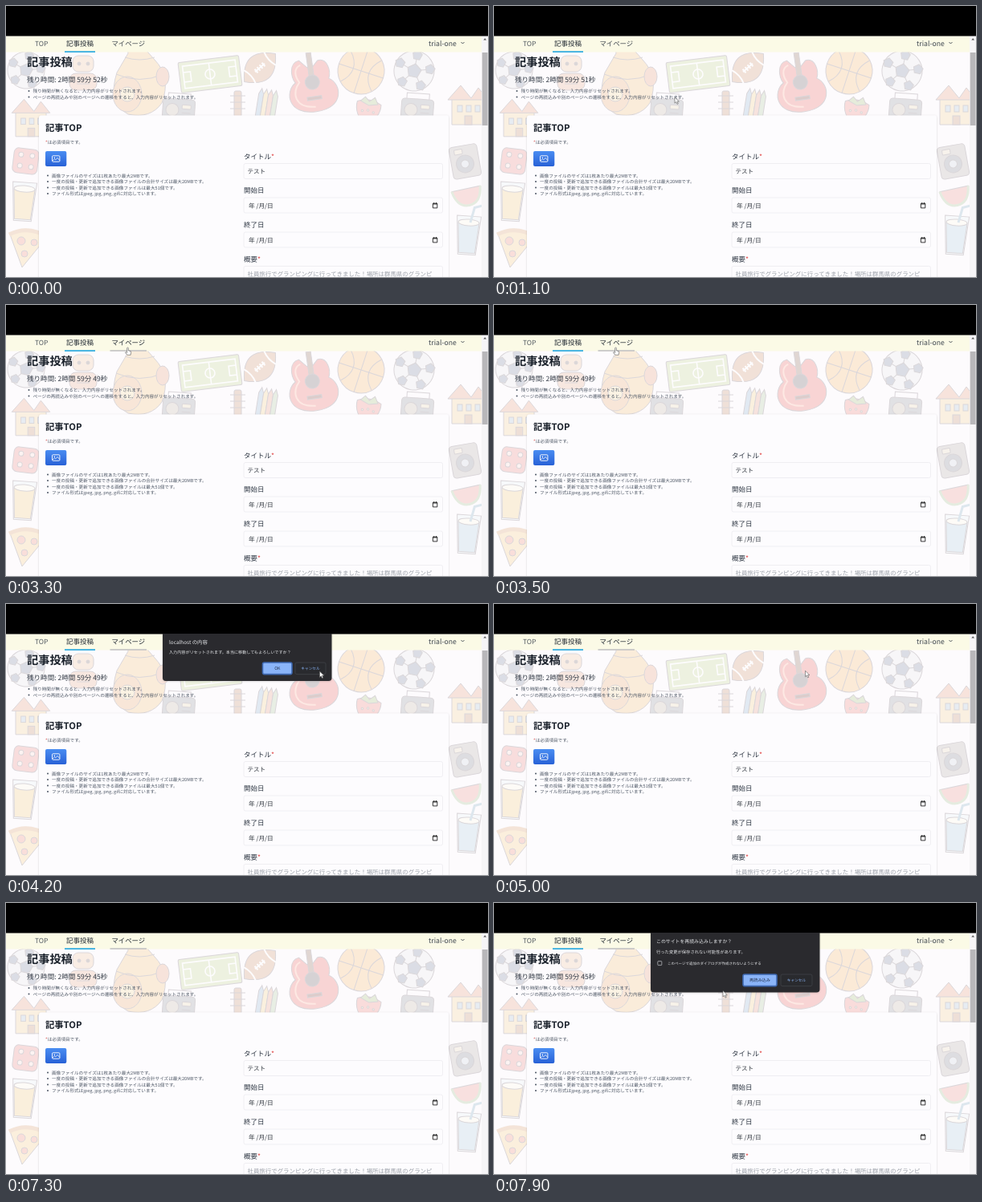
An HTML page for the animation above (8 s loop, 600 px wide and 338 px high).

```html
<!DOCTYPE html>
<html lang="ja">
<head>
<meta charset="utf-8">
<style>
html, body { margin: 0; width: 100%; height: 100%; overflow: hidden; background: #000; }
svg { display: block; width: 100vw; height: 100vh; }
text { font-family: "Noto Sans CJK JP", "Noto Sans", sans-serif; white-space: pre; text-rendering: geometricPrecision; }
</style>
</head>
<body>
<svg id="stage" viewBox="0 0 600 338" xmlns="http://www.w3.org/2000/svg"></svg>
<script>
const LOOP = 8000;
const stage = document.getElementById('stage');

const text = (x, y, size, str, fill = '#333a44', weight = 400, extra = '') =>
  `<text x="${x}" y="${y}" font-size="${size}" fill="${fill}" font-weight="${weight}" ${extra}>${str}</text>`;
const rect = (x, y, w, h, fill, r = 0, extra = '') =>
  `<rect x="${x}" y="${y}" width="${w}" height="${h}" rx="${r}" fill="${fill}" ${extra}/>`;
const circle = (x, y, r, fill, extra = '') => `<circle cx="${x}" cy="${y}" r="${r}" fill="${fill}" ${extra}/>`;
const ellipse = (x, y, rx, ry, fill) => `<ellipse cx="${x}" cy="${y}" rx="${rx}" ry="${ry}" fill="${fill}"/>`;
const path = (d, fill = 'none', extra = '') => `<path d="${d}" fill="${fill}" ${extra}/>`;
const at = (x, y, angle, body) => `<g transform="translate(${x} ${y}) rotate(${angle})">${body}</g>`;
const range = n => [...Array(n).keys()];

// Faded toy and leisure wallpaper
function soccerBall(x, y, r) {
  const patch = (cx, cy, s) => path('M' + range(5).map(i => {
    const a = (i * 72 - 90) * Math.PI / 180;
    return `${(cx + s * Math.cos(a)).toFixed(1)} ${(cy + s * Math.sin(a)).toFixed(1)}`;
  }).join('L') + 'Z', '#77839c');
  const outer = range(5).map(i => {
    const a = (i * 72 - 90) * Math.PI / 180;
    const c = Math.cos(a) * r, s = Math.sin(a) * r;
    return path(`M${c * .35} ${s * .35}L${c * .7} ${s * .7}`) + patch(c * .8, s * .8, r * .25);
  }).join('');
  return at(x, y, 12, circle(0, 0, r, '#e4e6ea') + patch(0, 0, r * .36) + outer);
}

function basketball(x, y, r) {
  return at(x, y, 18, circle(0, 0, r, '#f5b465') +
    path(`M0 ${-r}V${r}M${-r} 0H${r}M${-r * .7} ${-r * .7}Q0 0 ${-r * .7} ${r * .7}M${r * .7} ${-r * .7}Q0 0 ${r * .7} ${r * .7}`));
}

function football(x, y) {
  return at(x, y, -42, path('M-26 0Q-13 -17 0 -17Q13 -17 26 0Q13 17 0 17Q-13 17 -26 0Z', '#cf9069') +
    path('M-17 -11Q-13 0 -17 11M17 -11Q13 0 17 11M-8 0H8M-6 -3V3M-2 -3V3M2 -3V3M6 -3V3', 'none', 'stroke="#fff" stroke-width="2"'));
}

function guitar(x, y) {
  return at(x, y, -8,
    path('M-13 -34C-27 -32 -25 -14 -21 -7C-36 2 -36 32 0 32C36 32 36 2 21 -7C25 -15 23 -33 10 -31L3 -24H-4Z', '#ea5f58') +
    path('M-12 -28C-22 -25 -20 -14 -16 -7C-27 4 -27 24 0 26', 'none', 'stroke="#ffae95" stroke-width="2"') +
    rect(-3, -42, 6, 36, '#8b6552') + circle(0, -5, 9, '#63545a') + rect(-9, 13, 18, 4, '#7a3e36'));
}

function field(x, y) {
  return at(x, y, -7, rect(-38, -19, 76, 38, '#bdd08a', 2) +
    path('M-33 -14H33V14H-33ZM0 -14V14M-33 -6H-24V6H-33M33 -6H24V6H33', 'none', 'stroke="#fff" stroke-width="1.6"') +
    circle(0, 0, 6, 'none', 'stroke="#fff" stroke-width="1.6"'));
}

function backpack(x, y) {
  return at(x, y, 0, path('M-16 -50H14L10 -36L19 -26Q40 -4 28 28Q14 48 -14 42Q-40 28 -28 -10L-14 -34Z', '#f1bd70') +
    ellipse(-15, 17, 18, 22, '#eaa768') + circle(-15, 17, 9, '#f5d99a') +
    path('M-29 -8Q0 5 30 -8M-18 -29Q0 -23 19 -29') + ellipse(29, -5, 8, 12, '#e79a74'));
}

function toy(x, y) {
  return at(x, y, 0, rect(-13, -22, 26, 20, '#efc09a', 7) + rect(-17, 0, 34, 21, '#e6ab88', 8) +
    circle(-5, -12, 2, '#77665c') + circle(6, -12, 2, '#77665c') + path('M-24 8L-17 3M17 3L24 10M-8 13H8'));
}

function house(x, y, s) {
  return `<g transform="translate(${x} ${y}) scale(${s})">` +
    path('M-20 -8H20V24H-20Z', '#f2cf8e') + path('M-25 -7L-9 -25L4 -9L13 -22L25 -7Z', '#e59a7a') +
    [-13, -2, 9].map(i => rect(i, 0, 6, 8, '#a6bed2')).join('') + rect(-4, 13, 9, 11, '#c38966') + '</g>';
}

function strawberry(x, y) {
  return at(x, y, 10, path('M-15 -7Q0 -15 15 -7Q17 8 0 22Q-17 8 -15 -7Z', '#ee7c76') +
    path('M-11 -8L-6 -14L0 -9L6 -15L11 -7L0 -4Z', '#a0bc74') +
    [-7, 0, 7].map(i => circle(i, 2 + Math.abs(i) / 4, 1.2, '#ffe0a1')).join(''));
}

function dice(x, y) {
  return at(x, y, 7, rect(-16, -15, 31, 31, '#ea837e', 6) +
    [-7, 7].map(a => [-7, 7].map(b => circle(a, b, 3, '#fbd9d0')).join('')).join(''));
}

function glass(x, y, fill, straw) {
  return at(x, y, 4, path('M-15 -23H15L11 25H-11Z', '#e7f0f4') + path('M-13 -14H13L10 23H-10Z', fill) +
    ellipse(0, -15, 13, 4, '#fff8e5') + (straw ? path('M2 -15L6 -34L15 -37', 'none', 'stroke="#7ea9c1" stroke-width="3"') : ''));
}

function pizza(x, y) {
  return at(x, y, 0, path('M-22 -13Q0 -24 24 -10L-7 28Z', '#f4ca7c') +
    path('M-23 -13Q0 -25 25 -10', 'none', 'stroke="#d99f68" stroke-width="5"') +
    circle(-8, -5, 5, '#ec8770') + circle(8, -3, 4, '#ec8770') + circle(-4, 11, 4, '#ec8770'));
}

function camera(x, y) {
  return at(x, y, -10, rect(-17, -20, 35, 40, '#b3aaa6', 4) + circle(0, 3, 11, '#7c828c') +
    circle(0, 3, 5, '#c8d3dd') + rect(-11, -16, 10, 6, '#e6d6b8', 1));
}

function radio(x, y) {
  return at(x, y, 4, rect(-20, -13, 40, 26, '#8f9299', 4) + circle(-8, 1, 8, '#c3b6a6') +
    rect(4, -6, 11, 5, '#e6d5ae', 1) + path('M-14 -13V-20H14V-13M4 4H15M4 8H15'));
}

function pencilBox(x, y) {
  return at(x, y, 9, ['#8fb3d3', '#f0cf83', '#e79a80', '#a9c49a'].map((fill, i) =>
    path(`M${i * 6 - 12} 18V-10L${i * 6 - 9} -17L${i * 6 - 6} -10V18Z`, fill)).join(''));
}

const melonSlice = (x, y) => at(x, y, -12, path('M-17 -7H19Q16 14 1 14Q-14 14 -17 -7Z', '#ea8f86') +
  path('M-17 -7Q-14 14 1 14Q16 14 19 -7', 'none', 'stroke="#9fbc8b" stroke-width="3"'));

const wallpaper = `<g opacity=".25" stroke="#756a72" stroke-width="1">` + [
  soccerBall(25, 80, 23), toy(96, 84), backpack(166, 93), field(254, 85), football(316, 77),
  rect(284, 106, 9, 32, '#c58c69', 2), path('M279 112H298M279 120H298M279 128H298'), pencilBox(325, 121),
  guitar(382, 100), basketball(442, 81, 29), strawberry(451, 128), soccerBall(508, 81, 25),
  house(31, 140, .95), house(575, 124, 1), radio(512, 129), radio(215, 129),
  dice(25, 193), glass(22, 243, '#f2c879'), pizza(27, 298),
  camera(571, 194), melonSlice(573, 235), glass(575, 285, '#a9cbdc', true)
].join('') + '</g>';

// Page
const bullets = (x, y, step, lines) => lines.map((line, i) =>
  circle(x, y + i * step - 2.1, 1, '#4b5563') + text(x + 5, y + i * step, 5.6, line, '#4b5563')).join('');
const label = (y, str, star) =>
  text(296, y, 8.5, str + (star ? '<tspan fill="#e04444">*</tspan>' : ''), '#2b3440', 500);
const inputBox = (y, h = 19) => rect(296, y, 247.5, h, '#fdfcfe', 2, 'stroke="#ecebf0" stroke-width=".8"');
const dateField = y => inputBox(y) + text(302, y + 12.6, 7.7, '年 /月/日', '#30363e') +
  path(`M531.4 ${y + 7.3}h5.4v5.6h-5.4zM531.4 ${y + 8}h5.4M532.8 ${y + 6}v1.4M535.5 ${y + 6}v1.4`, 'none', 'stroke="#222" stroke-width=".9"');

const nav = rect(0, 37.5, 592, 20, '#fbfae6') +
  text(36, 49.8, 8.4, 'TOP', '#505860') + text(75, 49.8, 8.5, '記事投稿', '#222a33', 500) +
  text(131.5, 49.8, 8.4, 'マイページ', '#404850', 400, 'id="myPage"') +
  text(526, 49.8, 8.7, 'trial-one', '#404850') +
  path('M566.5 45l2 2l2-2', 'none', 'stroke="#404850" stroke-width=".9"') +
  rect(73, 56.2, 38, 1.8, '#38aee0') + rect(129.5, 56.2, 45.5, 1.6, '#c2c3c4', 0, 'id="navHover"');

const form = rect(41, 136.5, 510, 210, '#fdfcfe', 3, 'filter="url(#soft)"') +
  text(49, 156.3, 11.3, '記事TOP', '#1a212b', 700) +
  text(49, 172, 5.6, '<tspan fill="#d04444">*</tspan>は必須項目です。', '#4b5563') +
  rect(49, 181, 26.3, 19, 'url(#blue)', 2) +
  rect(57.5, 186.8, 9.4, 7.4, 'none', 1, 'stroke="#fff" stroke-width=".9"') +
  circle(60.3, 189.2, .8, '#fff') + path('M58 193l2.4-2.2l1.4 1.1l2.2-2.5l2.7 3', 'none', 'stroke="#fff" stroke-width=".8"') +
  bullets(52, 213.7, 7.5, [
    '画像ファイルのサイズは1枚あたり最大2MBです。',
    '一度の投稿・更新で追加できる画像ファイルの合計サイズは最大20MBです。',
    '一度の投稿・更新で追加できる画像ファイルは最大51個です。',
    'ファイル形式はjpeg, jpg, png, gifに対応しています。']) +
  label(190.8, 'タイトル', true) + inputBox(196.5) + text(300.5, 208.9, 7.5, 'テスト', '#30363e') +
  label(233.2, '開始日') + dateField(239) + label(275.8, '終了日') + dateField(282) +
  label(318.6, '概要', true) + inputBox(324.5, 40) +
  text(300.5, 336.6, 7.45, '社員旅行でグランピングに行ってきました！場所は群馬県のグランピ', '#9da2aa');

const scrollbar = rect(592, 37.5, 8, 301, '#f6f5f7') + path('M594.3 42.5l1.9-2.3l1.9 2.3z', '#555') +
  rect(592.7, 58, 6.8, 91, '#b8b7ba');

// Browser dialogs
const dialog = (id, h, body) => `<g id="${id}">` +
  path(`M195 37H405.5V${33 + h}q0 4-4 4H199q-4 0-4-4Z`, '#292a2e', 'filter="url(#soft)"') + body + '</g>';
const button = (x, y, w, str, primary) => primary
  ? rect(x, y, w, 14.6, '#8ab4f8', 2, 'stroke="#3e68b0" stroke-width="1.6"') +
    text(x + w / 2, y + 9.3, 5.2, str, '#202e48', 500, 'text-anchor="middle"')
  : rect(x, y, w, 14.6, '#292a2e', 2, 'stroke="#414348" stroke-width=".8"') +
    text(x + w / 2, y + 9.2, 4.7, str, '#8ab4f8', 500, 'text-anchor="middle"');

const leaveDialog = dialog('leave', 59,
  text(203, 49.6, 6.4, 'localhost の内容', '#e8eaed') +
  text(203, 62.3, 5.1, '入力内容がリセットされます。本当に移動してもよろしいですか？', '#e8eaed') +
  button(319.5, 73, 36.5, 'OK', true) + button(360, 73, 38, 'キャンセル'));
const reloadDialog = dialog('reload', 74.5,
  text(202, 49.6, 5.9, 'このサイトを再読み込みしますか？', '#e8eaed') +
  text(202, 62.6, 5.3, '行った変更が保存されない可能性があります。', '#e8eaed') +
  rect(203.8, 72.6, 5, 5, 'none', .7, 'stroke="#c5c8cc" stroke-width=".7"') +
  text(216, 77.3, 4.5, 'このページで追加のダイアログが作成されないようにする', '#e8eaed') +
  button(310, 89, 42, '再読み込み', true) + button(357, 89, 39, 'キャンセル'));

stage.innerHTML = `<defs>
  <linearGradient id="blue" x2="0" y2="1"><stop stop-color="#4a8df2"/><stop offset="1" stop-color="#2861d6"/></linearGradient>
  <filter id="soft" x="-5%" y="-5%" width="110%" height="115%"><feDropShadow dx="0" dy=".5" stdDeviation="1.2" flood-opacity=".16"/></filter>
  </defs>` + rect(0, 37, 600, 301, '#fdfbfd') + wallpaper + nav +
  text(26, 75.4, 14.2, '記事投稿', '#1a212b', 700) + text(26, 95.2, 8.55, '', '#333b46', 400, 'id="clock"') +
  bullets(28.5, 108, 7.6, ['残り時間が無くなると、入力内容がリセットされます。',
    'ページの再読込みや別のページへの遷移をすると、入力内容がリセットされます。']) +
  form + scrollbar + rect(0, 0, 600, 37.5, '#000') + leaveDialog + reloadDialog +
  '<g id="pointer" stroke="#555" stroke-width=".6" stroke-linejoin="round">' +
  path('M0 0V7.4L1.8 5.8L3 8.6L4.3 8L3.1 5.3H5.4Z', '#fff', 'id="arrow"') +
  path('M-.8 0Q0 -.9 .8 0V3.3L3.8 4.2Q4.6 5 3.6 8.8H-.7L-3.1 5.6Q-2.5 4.5 -.8 6Z', '#fff', 'id="hand"') + '</g>';

const el = Object.fromEntries([...stage.querySelectorAll('[id]')].map(node => [node.id, node]));
const show = (node, on) => node.setAttribute('visibility', on ? 'inherit' : 'hidden');

// Pointer stops: time, x, y
const route = [
  [200, 330, 140], [1000, 236, 114], [1500, 130, 112], [1900, 172, 90], [2200, 180, 80],
  [2800, 156, 48], [3300, 151.5, 53.5], [3600, 151.5, 53.5], [4200, 390.5, 84], [4400, 387.5, 83.3],
  [5500, 387.5, 83.3], [6300, 330, 130], [7700, 268, 50], [7900, 285, 109.5], [8000, 285, 109.5]
];

function pointerAt(t) {
  const next = Math.max(1, route.findIndex(stop => stop[0] > t));
  const [t0, x0, y0] = route[next - 1], [t1, x1, y1] = route[next];
  const p = Math.min(1, Math.max(0, (t - t0) / (t1 - t0)));
  const ease = p * p * (3 - 2 * p);
  return [x0 + (x1 - x0) * ease, y0 + (y1 - y0) * ease];
}

function render(now) {
  const t = Math.floor(now % LOOP / 100) * 100;
  const leaving = t >= 3600 && t < 4900;
  const seconds = 52 - (t >= 3000 && t < 5000 ? 3 : Math.floor(t / 1000));
  el.clock.textContent = `残り時間: 2時間 59分 ${seconds}秒`;
  show(el.leave, leaving);
  show(el.reload, t >= 7400);
  show(el.navHover, t >= 2700);
  el.myPage.setAttribute('fill', t >= 2700 ? '#222a33' : '#404850');
  show(el.pointer, t >= 200 && t < 6300 || t >= 7800);
  const onLink = t >= 2700 && t < 3700;
  el.hand.setAttribute('display', onLink ? 'inline' : 'none');
  el.arrow.setAttribute('display', onLink ? 'none' : 'inline');
  el.pointer.setAttribute('transform', `translate(${pointerAt(t).map(v => v.toFixed(2)).join(' ')})`);
  requestAnimationFrame(tick);
}

let start;
function tick(now) {
  start ??= now;
  render(now - start);
}
render(0);
</script>
</body>
</html>
```
